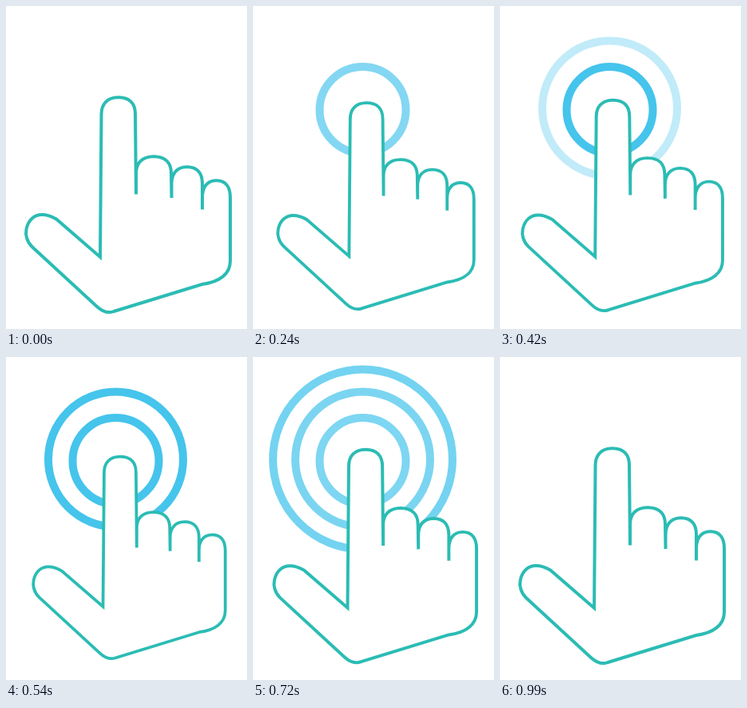
Animation of 302x404 px, one loop 1.32 s. Source, as an HTML page:

```html
<!DOCTYPE html>
<html lang="en">
<head>
<meta charset="utf-8">
<title>Tap gesture</title>
<style>
  html, body { margin: 0; height: 100%; overflow: hidden; background: #fff; }
  svg { display: block; width: 100%; height: 100%; }
</style>
</head>
<body>
<svg viewBox="0 0 302 404">
  <g fill="none" stroke="#45c4ec" stroke-width="10">
    <circle class="ring" cx="137.5" cy="130" r="54"/>
    <circle class="ring" cx="137.5" cy="128" r="84.5"/>
    <circle class="ring" cx="137.5" cy="128" r="112.5"/>
  </g>
  <path id="hand" fill="#fff" stroke="#2bbcb4" stroke-width="4"/>
</svg>
<script>
const LOOP = 1320, STEP = 30, RISE = 150;
const RING_START = [140, 370, 540];
const hand = document.getElementById('hand');
const rings = document.querySelectorAll('.ring');

// Rounded fingertip from the left side x0 to the right side x1
function tip(x0, x1, top) {
  const bend = (x1 - x0) * 0.16;
  return `L${x0} ${top + 21} C${x0} ${top + 9} ${x0 + bend} ${top} ${(x0 + x1) / 2} ${top}
    S${x1} ${top + 8} ${x1} ${top + 21}`;
}

// Folded finger: the crease below it, then its tip
const folded = (x0, x1, top, crease) => `L${x0} ${crease}` + tip(x0, x1, top);

hand.setAttribute('d', 'M118 314' + tip(119.5, 162, 114.3)
  + folded(163, 207, 188.2, 235.5)
  + folded(207.5, 246, 201.2, 240)
  + folded(246, 281, 218.3, 254.5)
  + 'V319 C281 335 268 345 246 348 L135 382 C127 385 120 381.5 114 376'
  + 'L33 301.5 C26 295 24 286 25.5 279 C28 267 36 261 45 261 C51 261 57 263 63 266.5 Z');

// Goes from 0 to 1 between the times a and b
const ramp = (t, a, b) => Math.min(1, Math.max(0, (t - a) / (b - a)));

function draw(t) {
  const press = ramp(t, 0, 180) - ramp(t, 180, 360) + ramp(t, 360, 540) - ramp(t, 540, 750);
  hand.setAttribute('transform',
    `translate(177 285) scale(${1 - 0.06 * press}) translate(-177 -285)`);
  rings.forEach((ring, i) => {
    const start = RING_START[i];
    const shown = ramp(t, start, start + RISE) - ramp(t, 600 + 45 * i, 990 - 90 * i);
    ring.setAttribute('opacity', shown);
  });
}

const begin = performance.now();
function tick() {
  const t = (performance.now() - begin) % LOOP;
  draw(Math.floor(t / STEP) * STEP);
  requestAnimationFrame(tick);
}
tick();
</script>
</body>
</html>
```
